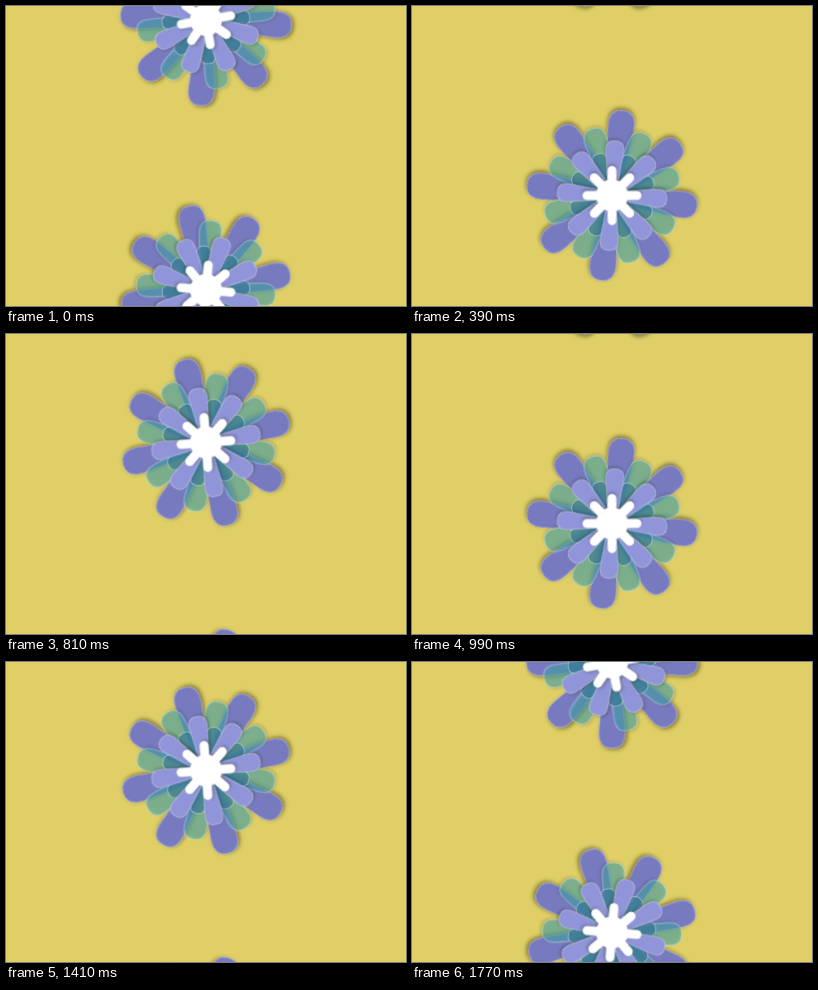
Write an HTML page without scripts that moves like this. It is 400 by 300 pixels and loops after 1.8 s.

```html
<!DOCTYPE html>
<html lang="en">
<head>
<meta charset="utf-8">
<title>Falling flowers</title>
<style>
  html, body { margin: 0; width: 100%; height: 100%; overflow: hidden; background: #dfcf66; }
  svg { display: block; width: 100vw; height: 100vh; --light: 30deg; --swing: -180deg; }

  .fall, .shade, .ring { animation: fall 600ms steps(20) -2ms infinite; }
  .shade { animation-name: swing; }
  .ring { animation-name: turn; }
  @keyframes fall { to { transform: translateY(270px); } }
  /* The shadow direction swings; each ring turns inside that frame.
     --a: angle at the top edge, --r: turn per loop, --k: loops already done */
  @keyframes swing {
    from { transform: rotate(calc(var(--light) + var(--swing) * var(--k))); }
    to { transform: rotate(calc(var(--light) + var(--swing) * (var(--k) + 1))); }
  }
  @keyframes turn {
    from { transform: rotate(calc(var(--a) - var(--light) + (var(--r) - var(--swing)) * var(--k))); }
    to { transform: rotate(calc(var(--a) - var(--light) + (var(--r) - var(--swing)) * (var(--k) + 1))); }
  }

  .big { --a: 0deg; --r: 75deg; fill: #777abf; }
  .green { --a: 31.5deg; --r: 60deg; fill: rgba(72, 172, 180, .55); }
  .teal { --a: 39.5deg; --r: 45deg; fill: rgba(50, 115, 145, .6); }
  .small { --a: 17deg; --r: 45deg; fill: #9094d8; }
  .star { --a: -10.5deg; --r: 15deg; fill: #fff; }

  .big, .green, .teal, .small { stroke: rgba(255, 255, 255, .5); stroke-width: .8; }
  .star { stroke: #fff; stroke-width: 9; stroke-linecap: round; }
  .lift { filter: drop-shadow(2.5px 0 2px rgba(50, 42, 5, .6)); }
  .soft { filter: drop-shadow(2px 0 1.5px rgba(40, 50, 40, .35)); }
</style>
</head>
<body>
<svg viewBox="0 0 400 300" preserveAspectRatio="none">
  <defs>
    <path id="p1" d="M-8-14L-13.3-68Q-14.5-86 0-86Q14.5-86 13.3-68L8-14Z"/>
    <path id="p2" d="M-7-14L-11.3-56Q-12.5-70 0-70Q12.5-70 11.3-56L7-14Z"/>
    <path id="p3" d="M-4-12L-7.5-34Q-8.5-44 0-44Q8.5-44 7.5-34L4-12Z"/>
    <path id="p4" d="M-5-12L-9-44Q-10-55 0-55Q10-55 9-44L5-12Z"/>

    <g id="h1"><use href="#p1"/><use href="#p1" transform="rotate(45)"/><use href="#p1" transform="rotate(90)"/><use href="#p1" transform="rotate(135)"/></g>
    <g id="h2"><use href="#p2"/><use href="#p2" transform="rotate(45)"/><use href="#p2" transform="rotate(90)"/><use href="#p2" transform="rotate(135)"/></g>
    <g id="h3"><use href="#p3"/><use href="#p3" transform="rotate(45)"/><use href="#p3" transform="rotate(90)"/><use href="#p3" transform="rotate(135)"/></g>
    <g id="h4"><use href="#p4"/><use href="#p4" transform="rotate(45)"/><use href="#p4" transform="rotate(90)"/><use href="#p4" transform="rotate(135)"/></g>

    <g id="big"><use href="#h1"/><use href="#h1" transform="rotate(180)"/></g>
    <g id="green"><use href="#h2"/><use href="#h2" transform="rotate(180)"/></g>
    <g id="teal"><use href="#h3"/><use href="#h3" transform="rotate(180)"/></g>
    <g id="small"><use href="#h4"/><use href="#h4" transform="rotate(180)"/></g>
    <g id="star">
      <circle r="16" stroke="none"/>
      <path d="M0-25V25M-25 0H25M-17.7-17.7L17.7 17.7M-17.7 17.7L17.7-17.7"/>
    </g>
  </defs>

  <rect width="400" height="300" fill="#dfcf66"/>
  <g class="fall">
    <g transform="translate(200 -256)" style="--k: -.95"><g class="shade">
      <g class="lift"><g class="ring big"><use href="#big"/></g></g>
      <g class="soft"><g class="ring green"><use href="#green"/></g></g>
      <g class="ring teal"><use href="#teal"/></g>
      <g class="soft"><g class="ring small"><use href="#small"/></g></g>
      <g class="soft"><g class="ring star"><use href="#star"/></g></g>
    </g></g>
    <g transform="translate(200 14)" style="--k: .05"><g class="shade">
      <g class="lift"><g class="ring big"><use href="#big"/></g></g>
      <g class="soft"><g class="ring green"><use href="#green"/></g></g>
      <g class="ring teal"><use href="#teal"/></g>
      <g class="soft"><g class="ring small"><use href="#small"/></g></g>
      <g class="soft"><g class="ring star"><use href="#star"/></g></g>
    </g></g>
    <g transform="translate(200 284)" style="--k: 1.05"><g class="shade">
      <g class="lift"><g class="ring big"><use href="#big"/></g></g>
      <g class="soft"><g class="ring green"><use href="#green"/></g></g>
      <g class="ring teal"><use href="#teal"/></g>
      <g class="soft"><g class="ring small"><use href="#small"/></g></g>
      <g class="soft"><g class="ring star"><use href="#star"/></g></g>
    </g></g>
  </g>
</svg>
</body>
</html>
```
